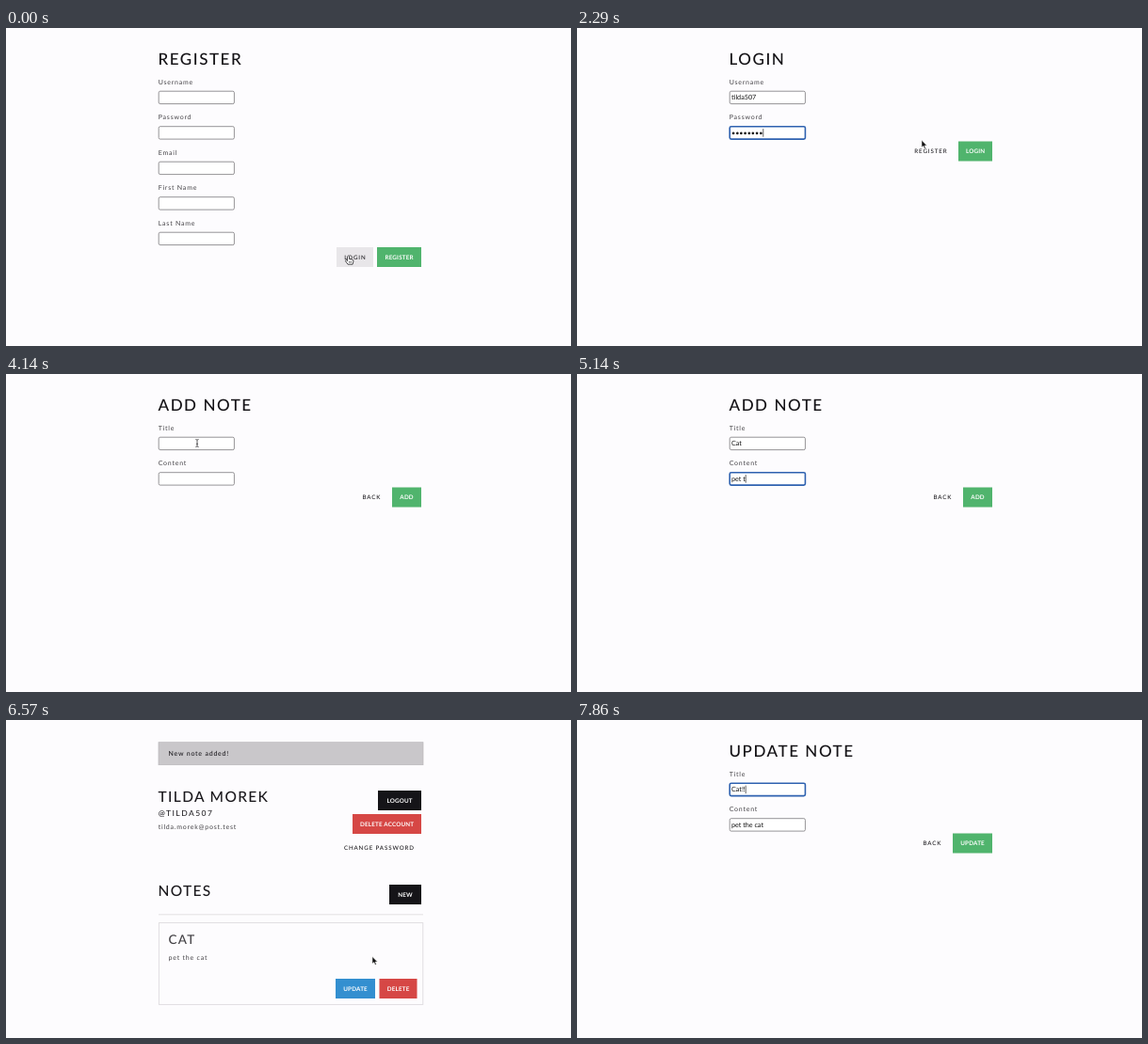
Recreate the animation shown at these times as an HTML page. Size 600 by 338 pixels, loop 8000 ms.

```html
<!DOCTYPE html>
<html lang="en">
<head>
<meta charset="utf-8">
<title>Notes app</title>
<style>
  html, body { margin: 0; width: 100%; height: 100%; overflow: hidden; background: #fdfcfe; }
  svg { display: block; width: 100vw; height: 100vh; }
  text { font-family: Lato, "Open Sans", sans-serif; text-rendering: geometricPrecision; white-space: pre; }
  .h1 { font-size: 17px; letter-spacing: 1.55px; font-weight: 500; fill: #151317; }
  .h2 { font-size: 15.5px; letter-spacing: 1.35px; font-weight: 500; fill: #1b191d; }
  .h3 { font-size: 13.5px; letter-spacing: 1.2px; font-weight: 500; fill: #454347; }
  .handle { font-size: 8.5px; letter-spacing: 1.45px; font-weight: 500; fill: #2a282c; }
  .body { font-size: 7px; letter-spacing: .78px; fill: #444246; }
  .flash { font-size: 7px; letter-spacing: .78px; font-weight: 500; fill: #1d1b1f; }
  .value { font-size: 7.2px; fill: #111; }
  .solid { font-size: 6.3px; letter-spacing: .18px; font-weight: 700; fill: #fff; text-anchor: middle; }
  .plain { font-size: 6.2px; letter-spacing: .88px; font-weight: 500; fill: #1b191d; text-anchor: middle; }
  .field { fill: #fff; stroke: #7b797d; stroke-width: .8; }
  .focus { fill: #fff; stroke: #2f62b0; stroke-width: 1.6; }
  .caret { stroke: #222; stroke-width: .7; }
</style>
</head>
<body>
<svg id="stage" viewBox="0 0 600 338" preserveAspectRatio="none"></svg>
<script>
const stage = document.getElementById('stage');
const LOOP = 8000, FPS = 7;
const GREEN = '#50b46d', RED = '#d64745', BLUE = '#338fd0', BLACK = '#151418', GREY = '#e8e6e9';
const USER = { first: 'Tilda', last: 'Morek', login: 'tilda507', mail: 'tilda.morek@post.test' };

// Page shown from each step on.
const pages = [[0, 'register'], [3, 'login'], [20, 'welcome'], [26, 'add'], [44, 'added'], [50, 'update']];

// Pointer waypoints: step, x, y, shape.
const route = [
  [0, 363.5, 242, 'hand'], [2, 364, 243, 'hand'], [3, 362, 240, 'arrow'], [5, 203, 74, 'beam'], [6, 203, 74, ''],
  [14, 250, 96, 'arrow'], [17, 424, 131, 'hand'], [20, 415, 123, 'hand'], [21, 416, 130, 'arrow'],
  [23, 424, 183, 'hand'], [26, 424, 183, 'arrow'], [29, 203, 73.5, 'beam'], [31, 203, 74, ''],
  [40, 300, 130, 'arrow'], [42, 424, 130, 'hand'], [44, 424, 130, 'arrow'], [46, 389, 251.5, 'arrow'],
  [48, 370, 284, 'hand'], [50, 370, 284, 'arrow'], [51, 300, 122, 'arrow'], [52, 203, 74, 'beam'], [53, 203, 74, '']
];

// Typed fields: focused in [on, off), text grows from `from` on.
const typing = {
  login: [
    { text: USER.login, on: 5, off: 10, from: 5, rate: 2 },
    { text: '•'.repeat(8), on: 10, off: 18, from: 10, rate: 2 }
  ],
  add: [
    { text: 'Cat', on: 30, off: 33, from: 30, rate: 1 },
    { text: 'pet the cat', on: 33, off: 43, from: 33, rate: 5 / 3 }
  ],
  update: [
    { text: 'Cat!!', kept: 3, on: 52, off: 56, from: 53, rate: 1 },
    { text: 'pet the cat', kept: 11, on: 56, off: 56, from: 56, rate: 0 }
  ]
};

const shapes = {
  hand: '<path d="M-1 .8Q0-.8 1 .8V3.4L4.6 4.2Q5.6 4.6 5.4 6L4.6 9.2H-.5L-3 5.7Q-3 4.4-1.8 4.8L-1 5.6ZM1.2 6V7.6M2.8 6V7.6" fill="#fff" stroke="#242226" stroke-width=".8" stroke-linejoin="round"/>',
  arrow: '<path d="M0 0V7.6L1.8 6L3 8.8L4.3 8.2L3.1 5.6H5.5Z" fill="#111" stroke="#fff" stroke-width=".5"/>',
  beam: '<path d="M-1.6-4Q0-4 0-3V3Q0 4-1.6 4M1.6-4Q0-4 0-3M0 3Q0 4 1.6 4M-1 .8H1" fill="none" stroke="#3a383c" stroke-width=".8"/>'
};

const text = (cls, x, y, str) => `<text class="${cls}" x="${x}" y="${y}">${str}</text>`;
const rect = (x, y, w, h, attrs) => `<rect x="${x}" y="${y}" width="${w}" height="${h}" ${attrs}/>`;

function button(x, right, y, label, fill) {
  const box = fill ? rect(x, y, right - x, 21, `fill="${fill}"`) : '';
  const cls = !fill || fill === GREY ? 'plain' : 'solid';
  return box + text(cls, (x + right) / 2 + (cls === 'plain' ? .4 : .1), y + 12.7, label);
}

function form(title, labels, step, inputs = []) {
  return text('h1', 161.5, 38.8, title) + labels.map((label, i) => {
    const y = 67 + i * 37.5, input = inputs[i];
    let out = text('body', 161.7, y - 7.5, label);
    const focused = input && step >= input.on && step < input.off;
    out += rect(162.2, y + .2, 80.2, 13.4, `rx="1.6" class="${focused ? 'focus' : 'field'}"`);
    if (input) {
      const count = (input.kept || 0) + Math.max(0, Math.floor((step - input.from) * input.rate + .01));
      out += `<text class="value" x="164" y="${y + 9.3}"${focused ? ' id="active"' : ''}>${input.text.slice(0, count)}</text>`;
      if (focused) out += `<path class="caret" id="caret" d="M0 ${y + 2.6}v8.6"/>`;
    }
    return out;
  }).join('');
}

function home(message, body) {
  return rect(162, 23.7, 281, 24, 'fill="#c9c7ca" stroke="#b9b7ba" stroke-width=".7"')
    + text('flash', 172.5, 38.2, message)
    + text('h2', 161.5, 86.6, `${USER.first} ${USER.last}`.toUpperCase())
    + text('handle', 161.7, 102, '@' + USER.login.toUpperCase())
    + text('body', 161.7, 116.3, USER.mail)
    + button(395, 441, 75, 'LOGOUT', BLACK)
    + button(368, 441, 100, 'DELETE ACCOUNT', RED)
    + button(351, 441, 125, 'CHANGE PASSWORD')
    + text('h2', 161.5, 186.6, 'NOTES')
    + button(407, 441, 175, 'NEW', BLACK)
    + '<path d="M162 206.8H443" stroke="#dddbde" stroke-width=".8"/>' + body;
}

const card = rect(162.4, 215.6, 280.4, 86.8, 'fill="none" stroke="#dddbde" stroke-width=".9"')
  + text('h3', 172.5, 238.3, 'CAT') + text('body', 172.5, 255.2, 'pet the cat')
  + button(350, 392, 275, 'UPDATE', BLUE) + button(396.5, 436.5, 275, 'DELETE', RED);

const draw = {
  register: s => form('REGISTER', ['Username', 'Password', 'Email', 'First Name', 'Last Name'], s)
    + button(351, 390, 233, 'LOGIN', GREY) + button(394, 441, 233, 'REGISTER', GREEN),
  login: s => form('LOGIN', ['Username', 'Password'], s, typing.login)
    + button(350, 401, 120.5, 'REGISTER') + button(405, 441, 120.5, 'LOGIN', GREEN),
  welcome: () => home(`Welcome, ${USER.first}!`, text('body', 161.7, 223.3, 'No notes yet!')),
  add: s => form('ADD NOTE', ['Title', 'Content'], s, typing.add)
    + button(370, 406, 120.5, 'BACK') + button(410, 441, 120.5, 'ADD', GREEN),
  added: () => home('New note added!', card),
  update: s => form('UPDATE NOTE', ['Title', 'Content'], s, typing.update)
    + button(359, 395, 120.5, 'BACK') + button(399, 441, 120.5, 'UPDATE', GREEN)
};

const lastAt = (rows, step) => rows.reduce((found, row, i) => row[0] <= step ? i : found, 0);

function pointer(step) {
  const i = lastAt(route, step);
  const [k, x, y, shape] = route[i];
  if (!shape) return '';
  const [k2, x2, y2] = route[i + 1] || route[i];
  const p = k2 > k ? (step - k) / (k2 - k) : 0;
  return `<g transform="translate(${x + (x2 - x) * p} ${y + (y2 - y) * p})">${shapes[shape]}</g>`;
}

function render(step) {
  const page = pages[lastAt(pages, step)][1];
  stage.innerHTML = rect(0, 0, 600, 338, 'fill="#fdfcfe"') + draw[page](step) + pointer(step);
  const active = document.getElementById('active');
  if (active) {
    const x = 164.4 + active.getComputedTextLength();
    document.getElementById('caret').setAttribute('transform', `translate(${x} 0)`);
  }
}

const start = performance.now();
let shown = -1;
function tick() {
  const t = (performance.now() - start) % LOOP;
  const step = Math.floor((t + 5) * FPS / 1000) % (LOOP * FPS / 1000);
  if (step !== shown) render(shown = step);
  requestAnimationFrame(tick);
}
tick();
</script>
</body>
</html>
```
